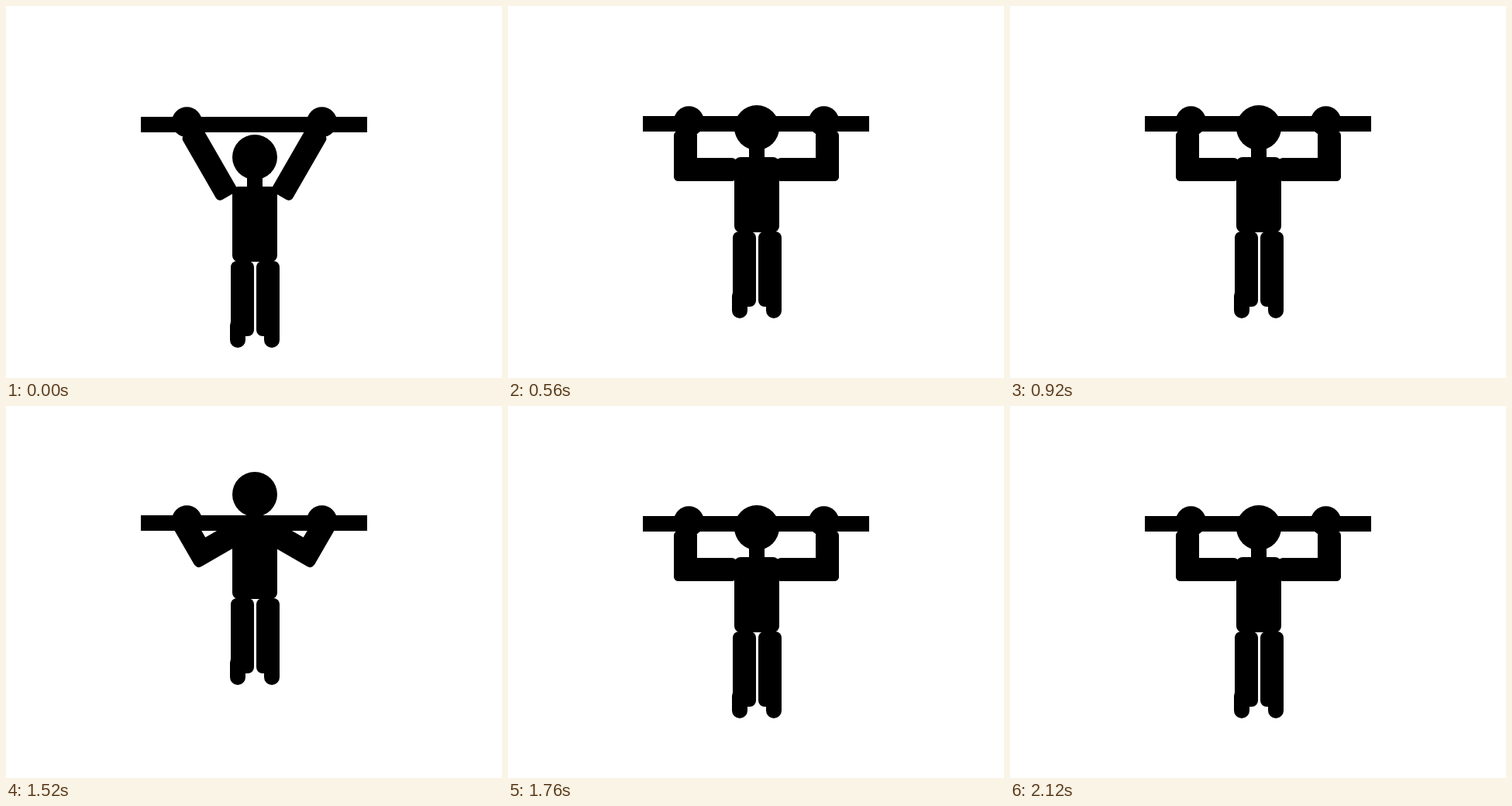
An HTML page with a canvas for the animation above (2.36 s loop, 640x480 px).

```html
<!DOCTYPE html>
<html lang="en">
<head>
<meta charset="utf-8">
<title>Pull-ups</title>
<style>
  html, body { margin: 0; width: 100%; height: 100%; overflow: hidden; background: #fff; }
  canvas { display: block; }
</style>
</head>
<body>
<canvas id="stage" width="640" height="480"></canvas>
<script>
const ctx = document.getElementById("stage").getContext("2d");
const LOOP = 2360;
const MIRROR = 641;
const LIMB = 30;

// Limbs: centre x, centre y, length, angle in degrees (left side only).
const hang = { lift: 0, bar: 143, arms: [[262.6, 203.4, 97, 60]] };
const half = { lift: 38, bar: 142, arms: [[229, 193.5, 65, 90], [254.5, 211, 81, 0]] };
const top_ = { lift: 81, bar: 141, arms: [[242.3, 173.6, 65, 60], [274.3, 177.1, 81, -30]] };

function poseAt(time) {
  if (time < 560) return hang;
  if (time < 1160) return half;
  return time < 1760 ? top_ : half;
}

function disc(x, y, r) {
  ctx.beginPath();
  ctx.arc(x, y, r, 0, Math.PI * 2);
  ctx.fill();
}

function block(x, y, w, h, r) {
  ctx.beginPath();
  ctx.roundRect(x, y, w, h, r);
  ctx.fill();
}

function limb(x, y, length, degrees) {
  ctx.save();
  ctx.translate(x, y);
  ctx.rotate(degrees * Math.PI / 180);
  block(-length / 2, -LIMB / 2, length, LIMB, 6);
  ctx.restore();
}

function drawBody(lift) {
  ctx.save();
  ctx.translate(0, -lift);
  disc(321, 195, 29);
  ctx.fillRect(311, 215, 20, 25);
  block(292, 233, 58, 97, 8);
  for (const x of [290, 323]) block(x, 329, LIMB, 97, 8);
  for (const x of [289, 333]) block(x, 402, 20, 39, 10);
  ctx.restore();
}

function draw(pose) {
  ctx.fillStyle = "#fff";
  ctx.fillRect(0, 0, 640, 480);
  ctx.fillStyle = "#000";
  ctx.fillRect(174, pose.bar, 292, 20);
  for (const x of [233.4, 407.6]) disc(x, pose.bar + 6.7, 19.5);
  for (const [x, y, length, angle] of pose.arms) {
    limb(x, y, length, angle);
    limb(MIRROR - x, y, length, -angle);
  }
  drawBody(pose.lift);
}

const start = performance.now();
function tick() {
  draw(poseAt((performance.now() - start) % LOOP));
  requestAnimationFrame(tick);
}
tick();
</script>
</body>
</html>
```
